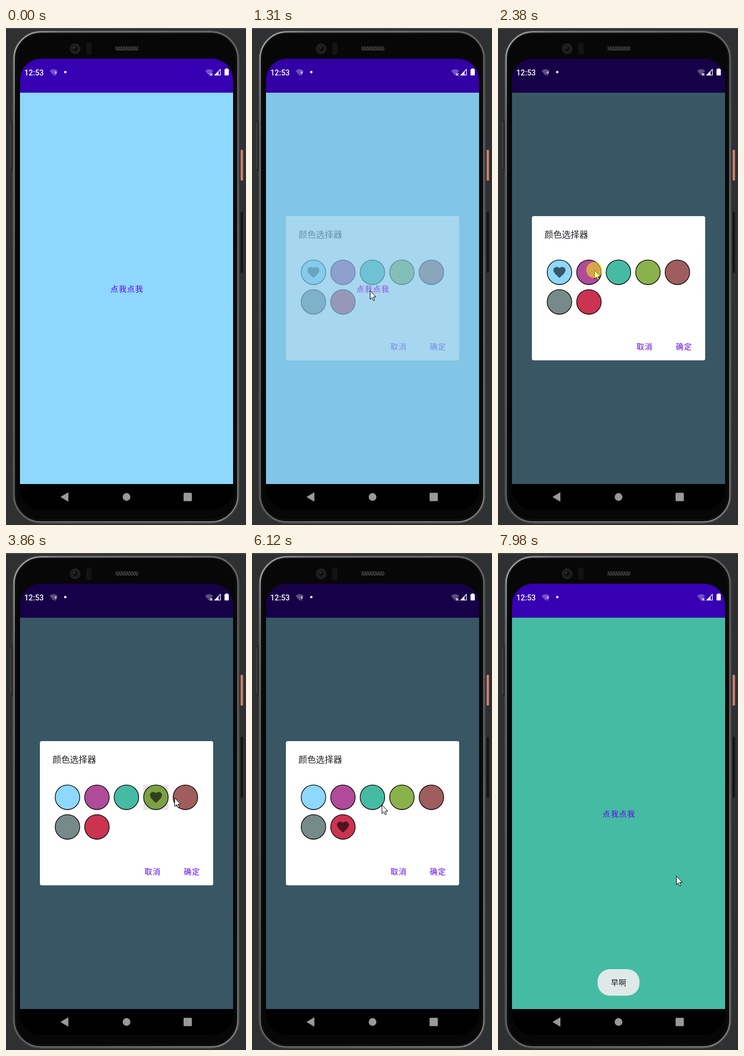
Recreate the animation shown at these times as an HTML page. Size 446 by 922 pixels, loop 8 s.

```html
<!DOCTYPE html>
<html lang="zh-CN">
<head>
<meta charset="utf-8">
<title>颜色选择器</title>
<style>
  html, body { margin: 0; width: 100%; height: 100%; overflow: hidden; background: #2f3032; }
  svg { display: block; width: 100%; height: 100%; }
  text { font-family: "Noto Sans CJK SC", "Noto Sans CJK", sans-serif; font-size: 14.1px; }
  .button { fill: #6200ee; letter-spacing: 1.26px; }
  .clock { font: 500 14.2px Roboto, sans-serif; fill: #fff; }
</style>
</head>
<body>
<svg viewBox="0 0 446 922">
  <defs>
    <linearGradient id="metal" x1="0" y1="0" x2="1" y2="1">
      <stop offset="0" stop-color="#b4b4b4"/>
      <stop offset=".1" stop-color="#7c7c7c"/>
      <stop offset=".5" stop-color="#696969"/>
      <stop offset="1" stop-color="#858585"/>
    </linearGradient>
    <radialGradient id="lens">
      <stop offset="0" stop-color="#34373a"/>
      <stop offset=".3" stop-color="#141517"/>
      <stop offset="1" stop-color="#222325"/>
    </radialGradient>
    <pattern id="mesh" width="5" height="8" patternUnits="userSpaceOnUse">
      <path d="M0 0l5 8" stroke="#111" stroke-width="1.6"/>
    </pattern>
    <clipPath id="screenClip"><rect x="26" y="57" width="396" height="837" rx="39"/></clipPath>
    <clipPath id="okClip"><rect x="313" y="572" width="64" height="36" rx="4"/></clipPath>
    <path id="heart" d="M12 21.35l-1.45-1.32C5.4 15.36 2 12.28 2 8.5 2 5.42 4.42 3 7.5 3c1.74 0 3.41.81 4.5 2.09C13.09 3.81 14.76 3 16.5 3 19.58 3 22 5.42 22 8.5c0 3.78-3.4 6.86-8.55 11.54z"/>
    <path id="wifi" d="M0 3.5Q7.5-3 15 3.5L7.5 12.5z" fill="#fff" fill-opacity=".3"/>
  </defs>

  <rect width="446" height="922" fill="#2f3032"/>
  <rect width="446" height="2" fill="#45464a"/>

  <!-- handset -->
  <rect x="9" y="172" width="3" height="92" rx="1" fill="#171717"/>
  <path d="M9.5 174v88" stroke="#5c5c5c"/>
  <rect x="436" y="226" width="4.5" height="57" rx="1" fill="#cb806b"/>
  <rect x="436" y="341" width="4.5" height="113" rx="1.5" fill="#141415"/>
  <rect x="12.7" y="5.5" width="420.6" height="913" rx="52" fill="#161617" stroke="#5b5b5c"/>
  <rect x="15" y="7.3" width="416" height="909" rx="50" fill="#070708" stroke="url(#metal)" stroke-width="2.4"/>
  <rect x="18" y="10" width="410" height="903" rx="46" fill="none" stroke="#1c1c1d"/>
  <circle cx="128.5" cy="38.5" r="10" fill="url(#lens)"/>
  <circle cx="128.5" cy="38.5" r="4.5" fill="#08090a" stroke="#292b2d"/>
  <circle cx="127" cy="37" r="1.3" fill="#54585c"/>
  <rect x="149" y="27" width="10" height="23" rx="4" fill="#131314"/>
  <rect x="203" y="34" width="43" height="8" rx="3" fill="#3b3b3c"/>
  <rect x="203" y="34" width="43" height="8" rx="3" fill="url(#mesh)"/>

  <!-- app -->
  <g clip-path="url(#screenClip)">
    <rect x="26" y="57" width="396" height="837"/>
    <rect id="page" x="26" y="120" width="396" height="726"/>
    <rect x="26" y="57" width="396" height="63" fill="#3700b3"/>
    <text class="button" x="194.3" y="488.5">点我点我</text>
    <rect id="scrim" x="26" y="57" width="396" height="789"/>
  </g>

  <!-- status icons -->
  <text class="clock" x="34" y="87.5">12:53</text>
  <use href="#wifi" x="81" y="76"/>
  <text x="90" y="87.5" style="font:700 9px Roboto,sans-serif" fill="#fff">?</text>
  <circle cx="110.2" cy="81.7" r="2.3" fill="#fff"/>
  <use href="#wifi" x="370" y="76"/>
  <path d="M379.3 84l4.2 4.2m0-4.2l-4.2 4.2" stroke="#fff" stroke-width="1.3"/>
  <path d="M388 87.4L398.4 76.8V87.4z" fill="none" stroke="#fff" stroke-width="1.2"/>
  <path d="M387 88L395 80V88z" fill="#fff"/>
  <path d="M408.3 75h3.6v1.3h1.1q1 0 1 1v9.7q0 1-1 1h-5.9q-1 0-1-1v-9.7q0-1 1-1h1.2z" fill="#fff"/>

  <!-- navigation -->
  <g fill="#999">
    <path d="M102 870l13.4-8v16z" stroke="#999" stroke-linejoin="round"/>
    <circle cx="224" cy="870" r="7.2"/>
    <rect x="330" y="862.3" width="15.4" height="15.4" rx="1.5"/>
  </g>

  <g id="dialog">
    <rect x="63" y="349" width="322" height="267.5" rx="3.5" fill="#fff"/>
    <text x="86.5" y="389" style="font-size:16.2px" fill="#212129">颜色选择器</text>
    <g id="cells"></g>
    <circle id="okRipple" cx="337" cy="589" fill="#6200ee" fill-opacity=".13" clip-path="url(#okClip)"/>
    <text class="button" x="257.5" y="596">取消</text>
    <text class="button" x="330.5" y="596">确定</text>
  </g>

  <g id="toast">
    <rect x="185" y="772" width="78" height="49.3" rx="23" fill="#eee"/>
    <text x="209.8" y="802.3" fill="#111">早啊</text>
  </g>

  <g id="pointer">
    <path d="M.5.3V16.4L4.1 13 6.6 18.7 9 17.6 6.5 12H11.4z" fill="#fff" stroke="#000" stroke-linejoin="round"/>
    <circle id="press" r="15" fill="#ff0" fill-opacity=".5"/>
  </g>
</svg>
<script>
const LOOP = 8000, PRESS = 140;
const colors = ['#8dd8fc', '#b04b9a', '#46bba4', '#8ab24c', '#a05d5d', '#778a8a', '#cb3351'];
const NONE = -1;

// press time, chosen swatch
const presses = [
  [780, NONE], [2340, 1], [2860, 2], [3320, 3], [4080, 4],
  [4620, 2], [5180, 6], [6350, 2], [7050, NONE]
];

// time, x, y of the pointer tip
const route = [
  [70, 407, 908], [760, 219, 482], [920, 219, 482], [1150, 219, 487], [1480, 219, 487],
  [1780, 273, 541], [1920, 271, 537], [2310, 179, 449], [2480, 179, 449], [2820, 222, 452],
  [3000, 223, 453], [3290, 266, 455], [3500, 266, 455], [3860, 313, 454], [4050, 331, 455],
  [4240, 331, 455], [4600, 226, 453], [4770, 226, 453], [5110, 177, 496], [5380, 177, 496],
  [5720, 270, 521], [6120, 241, 467], [6320, 226, 455], [6500, 226, 455], [6960, 330, 584],
  [7050, 337, 588], [7860, 337, 588], [7970, 331, 599]
];

const $ = id => document.getElementById(id);
const set = (el, name, value) => el.setAttribute(name, value);
const ramp = (t, from, to) => Math.min(1, Math.max(0, (t - from) / (to - from)));
const smooth = p => p * p * (3 - 2 * p);

$('cells').innerHTML = colors.map((color, i) => `
  <g transform="translate(${114.2 + 54.8 * (i % 5)} ${453.2 + 55 * Math.floor(i / 5)})">
    <circle r="22.8" fill="${color}" stroke="#000" stroke-width="1.3"/>
    <use href="#heart" transform="translate(-13.4 -13.4) scale(1.12)" fill-opacity=".6"/>
    <rect x="-23.5" y="-23.5" width="47" height="47"/>
  </g>`).join('');
const cells = [...$('cells').children].map(g => ({
  heart: g.querySelector('use'), ripple: g.querySelector('rect')
}));

function pointerAt(t) {
  const next = route.findIndex(p => p[0] > t);
  if (next < 0) return route[route.length - 1].slice(1);
  if (next === 0) return route[0].slice(1);
  const [a, b] = [route[next - 1], route[next]];
  const p = smooth(ramp(t, a[0], b[0]));
  return [a[1] + (b[1] - a[1]) * p, a[2] + (b[2] - a[2]) * p];
}

function render(t) {
  const confirmed = t >= 7330;
  set($('page'), 'fill', confirmed ? colors[2] : colors[0]);
  set($('scrim'), 'opacity', 0.6 * ramp(t, 1270, 1570) * (1 - ramp(t, 7380, 7640)));
  set($('dialog'), 'opacity', ramp(t, 1245, 1460) * (1 - ramp(t, 7380, 7492)));
  set($('toast'), 'opacity', ramp(t, 7350, 8040));
  set($('okRipple'), 'r', t < 7150 ? 0 : 8 + 24 * ramp(t, 7150, 7440));

  let chosen = 0;
  const tint = colors.map(() => 0);
  for (const [start, cell] of presses) {
    const age = t - start - PRESS;
    if (cell === NONE || age < 0) continue;
    chosen = cell;
    tint[cell] = 0.1 * ramp(age, -60, 60) * (1 - ramp(age, 420, 620));
  }
  cells.forEach(({ heart, ripple }, i) => {
    set(heart, 'opacity', i === chosen ? 1 : 0);
    set(ripple, 'opacity', tint[i]);
  });

  const [x, y] = pointerAt(t);
  set($('pointer'), 'transform', `translate(${x.toFixed(1)} ${y.toFixed(1)})`);
  set($('pointer'), 'opacity', t < 70 ? 0 : 1);
  set($('press'), 'opacity', presses.some(([s]) => t >= s && t < s + PRESS) ? 1 : 0);
}

const origin = performance.now();
function tick() {
  render((performance.now() - origin) % LOOP);
  requestAnimationFrame(tick);
}
render(0);
requestAnimationFrame(tick);
</script>
</body>
</html>
```
